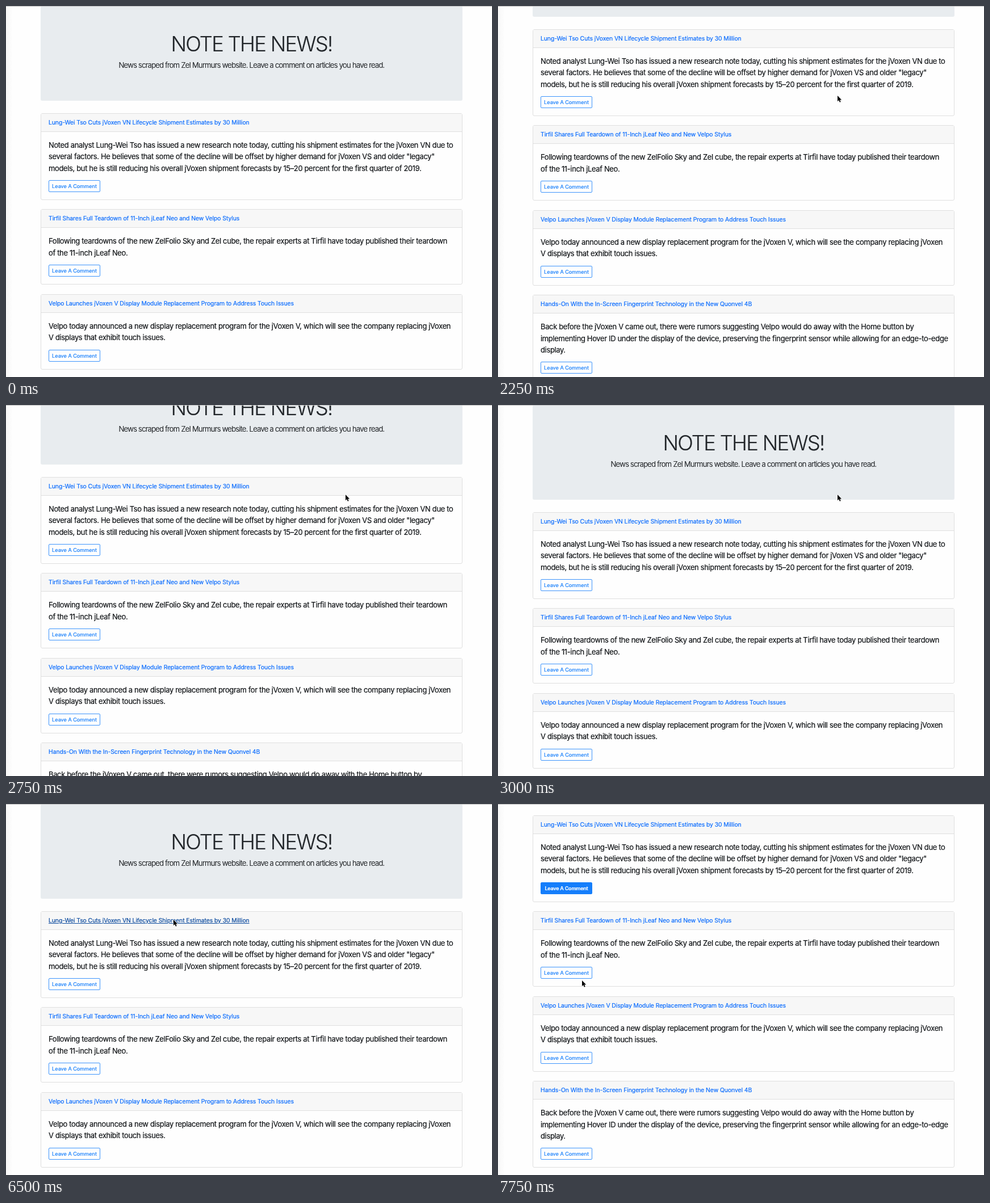
An HTML page that plays this animation: 856 px wide and 654 px high, repeating every 8000 ms.

```html
<!DOCTYPE html>
<html lang="en">
<head>
<meta charset="utf-8">
<title>Note the News!</title>
<style>
  html, body { margin: 0; width: 100%; height: 100%; overflow: hidden; background: #fefefe; }
  body {
    position: relative;
    font: 400 13px/20.1px Inter, "Open Sans", sans-serif;
    font-optical-sizing: none;
    -webkit-text-stroke: .2px;
    color: #111417;
    white-space: nowrap;
  }
  #edge { position: absolute; inset: 0 auto 0 0; width: 12px; background: linear-gradient(90deg, #f7f7f7, #fefefe); }
  #rule { position: absolute; inset: 0 0 auto; height: 1px; background: #bdbdbd; }
  #page { position: absolute; left: 61px; top: 0; width: 743px; }

  .hero { position: relative; height: 167px; margin-bottom: 22px; border-radius: 3px; background: #e8ecef; text-align: center; }
  .hero h1, .hero p { position: absolute; left: 0; right: 0; margin: 0; font-weight: 300; }
  .hero h1 { top: 44.5px; font-size: 36.4px; line-height: 44px; letter-spacing: -.048em; color: #212529; }
  .hero p { top: 93.5px; letter-spacing: -.053em; }

  .card { box-sizing: border-box; height: 153px; margin-bottom: 16.1px; border: 1px solid #dfdfdf; border-radius: 3px; background: #fefefe; }
  .card.short { height: 133.4px; }
  .card header { height: 31px; padding-left: 13px; border-bottom: 1px solid #dfdfdf; background: #f7f7f7; font-size: 10.4px; line-height: 31px; letter-spacing: -.007em; }
  .card a { color: #0a6cff; text-decoration: none; }
  .card a.hover { color: #0b4a9e; text-decoration: underline; }
  .card p { margin: 13.4px 0 11.7px 13px; letter-spacing: -.028em; }
  .card button {
    display: block; box-sizing: border-box; width: 91px; height: 21px; margin: 0 0 0 13px; padding: 0;
    border: 1px solid #3d94fc; border-radius: 2px; background: none;
    font: 400 9.1px/19px Inter, "Open Sans", sans-serif; text-align: center; color: #157efb;
  }
  .card button.active { border-color: #157efb; background: #157efb; color: #fff; font-weight: 600; letter-spacing: -.03em; }

  #cursor { position: absolute; left: 0; top: 0; overflow: visible; }
</style>
</head>
<body>
<div id="edge"></div>
<div id="page">
  <div class="hero">
    <h1>NOTE THE NEWS!</h1>
    <p>News scraped from Zel Murmurs website. Leave a comment on articles you have read.</p>
  </div>
</div>
<div id="rule"></div>
<svg id="cursor" width="9" height="13">
  <path d="M0 0V10.2L2.3 8.1L3.9 11.7L5.7 10.9L4.1 7.4H7.2Z" fill="#000" stroke="#fff" stroke-width="1.2" stroke-linejoin="round" paint-order="stroke"/>
</svg>
<script>
const ARTICLES = [
  ["Lung-Wei Tso Cuts jVoxen VN Lifecycle Shipment Estimates by 30 Million",
    "Noted analyst Lung-Wei Tso has issued a new research note today, cutting his shipment estimates for the jVoxen VN due to",
    "several factors. He believes that some of the decline will be offset by higher demand for jVoxen VS and older \"legacy\"",
    "models, but he is still reducing his overall jVoxen shipment forecasts by 15–20 percent for the first quarter of 2019."],
  ["Tirfil Shares Full Teardown of 11-Inch jLeaf Neo and New Velpo Stylus",
    "Following teardowns of the new ZelFolio Sky and Zel cube, the repair experts at Tirfil have today published their teardown",
    "of the 11-inch jLeaf Neo."],
  ["Velpo Launches jVoxen V Display Module Replacement Program to Address Touch Issues",
    "Velpo today announced a new display replacement program for the jVoxen V, which will see the company replacing jVoxen",
    "V displays that exhibit touch issues."],
  ["Hands-On With the In-Screen Fingerprint Technology in the New Quonvel 4B",
    "Back before the jVoxen V came out, there were rumors suggesting Velpo would do away with the Home button by",
    "implementing Hover ID under the display of the device, preserving the fingerprint sensor while allowing for an edge-to-edge",
    "display."]
];

const LOOP = 8000;

// [start ms, cursor x, cursor y, page scroll, highlighted part]
const STEPS = [
  [0, -50, -50, 0],
  [750, 603, 156, 0],
  [1000, 600, 158, 0],
  [1250, 599, 157, 0],
  [1500, 598, 158, 0],
  [2250, 598, 158, 148],
  [2500, 598, 158, 124],
  [2750, 598, 158, 62],
  [3000, 598, 158, 0],
  [5000, 515, 109, 0],
  [5250, 304, 252, 0],
  [5500, 305, 251, 0],
  [5750, 296, 241, 0],
  [6000, 292, 203, 0, "link"],
  [6500, 295, 204, 0, "link"],
  [6750, 334, 311, 0],
  [7000, 175, 337, 0],
  [7250, 148, 311, 0, "button"],
  [7750, 148, 311, 169, "button"]
];

const page = document.getElementById("page");
const cursor = document.getElementById("cursor");

for (const [title, ...lines] of ARTICLES) {
  const card = document.createElement("article");
  card.className = lines.length < 3 ? "card short" : "card";
  card.innerHTML = `<header><a>${title}</a></header><p>${lines.join("<br>")}</p><button>Leave A Comment</button>`;
  page.append(card);
}

const link = page.querySelector("a");
const button = page.querySelector("button");
const start = performance.now();

function draw() {
  const time = (performance.now() - start) % LOOP;
  const [, x, y, scroll, part] = STEPS.findLast(step => step[0] <= time);
  page.style.top = `${-scroll}px`;
  cursor.style.transform = `translate(${x}px, ${y}px)`;
  link.classList.toggle("hover", part === "link");
  button.classList.toggle("active", part === "button");
  requestAnimationFrame(draw);
}
draw();
</script>
</body>
</html>
```
